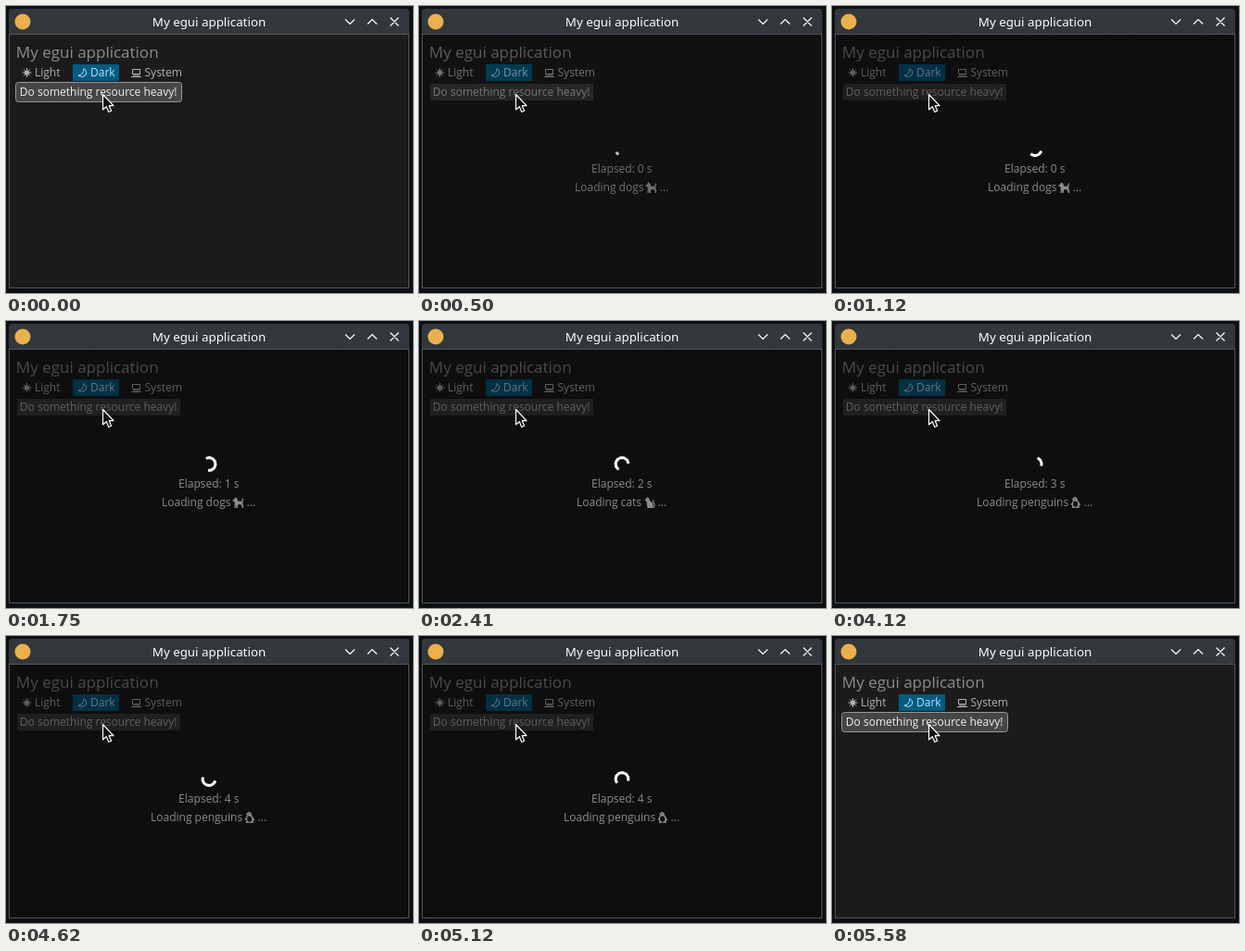
An HTML page for the animation above (6290 ms loop, 439 by 310 pixels).

```html
<!DOCTYPE html>
<html lang="en">
<head>
<meta charset="utf-8">
<title>My egui application</title>
<style>
  html, body { margin: 0; width: 100%; height: 100%; overflow: hidden; background: #0d1013; }
  svg { display: block; width: 439px; height: 310px; }
  text { font: 12px "Open Sans", "Noto Sans", sans-serif; white-space: pre; }
  .bar { font: 13.33px "Noto Sans", "Open Sans", sans-serif; fill: #fcfcfc; text-anchor: middle; }
  .heading { font-size: 17px; fill: #8c8c8c; }
  .line { fill: none; stroke: currentColor; stroke-width: 1; }
  .controls { fill: none; stroke: #fcfcfc; stroke-width: 1.2; }
  .light { fill: #b4b4b4; color: #b4b4b4; }
  .chosen { fill: #c0deff; color: #c0deff; }
  #modal { fill: #8c8c8c; }
  #spinner { fill: none; stroke: #fff; stroke-width: 3; stroke-linejoin: round; }

  #button rect { fill: #3c3c3c; }
  #button text { fill: #b4b4b4; }
  #button.hover rect, #button.press rect { x: 10.5px; y: 82.5px; width: 179px; height: 21px; rx: 3px; }
  #button.hover rect { fill: #464646; stroke: #969696; }
  #button.hover text { fill: #f0f0f0; }
  #button.press rect { fill: #373737; stroke: #fff; }
  #button.press text { fill: #fff; }
</style>
</head>
<body>
<svg viewBox="0 0 439 310">
  <defs>
    <linearGradient id="barFill" x2="0" y2="1">
      <stop stop-color="#33383d"/>
      <stop offset="1" stop-color="#2b3035"/>
    </linearGradient>
    <path id="dog" d="M.3 3.6 2 2.9 2.6 1.3 3.4.3 4.3 1.3 5.6 2 5.9 4.5 9.6 4.7 10.6 3.7 10.8 1.8 11.9 1.2 12 3.5 11.3 5.4 11.4 8 12.2 9.4 11.9 12H10.6L10.5 10 9.2 8.3 6.2 8.2 5.8 12H4.5L4.2 8.8 3.6 12H2.4L2.7 7.4 2.6 5.2.7 4.9Z"/>
    <path id="cat" d="M1 2.8 2.3 1.5 2.6.1 3.7 1 5 1.1 5.7 2.9 6 4.6 8 5.7 9.3 7.6 9.2 10 10.4 10.2 10.2 8 9 5.5 9.2 3.2 10.3 2.6 10.2 5.2 11.4 7.8 11.4 10.6 10.4 11.6 8.8 12H3.2L3.4 10.8 2.6 7.4 2.7 5.2 1.3 4.5Z"/>
    <g id="penguin">
      <path d="M3.8.3C5.9-.5 7.6.8 7.8 2.8 8 4 9.4 5.2 10.3 7.2L11.4 9.2 10 8.9 9.4 10.8 10.4 11.8 6.6 12 5.6 11.2 4.6 12 1.4 11.8 2.4 10.6 1.7 8.6.4 9 1.5 6.7C2.5 5 3 4.2 2.9 3L1.6 2.4 3 1.5Z"/>
      <path fill="#0e0e0e" d="M4 4.2Q5.6 5.3 7 4.4 8.7 7 8.2 9.2 7.3 10.7 5.6 10.7 3.6 10.6 3 8.6 2.9 6.1 4 4.2ZM4.4 1.5h1v1h-1z"/>
    </g>
  </defs>

  <rect width="439" height="310" fill="#0d1013"/>
  <path d="M3 305V7Q3 3 7 3H431Q435 3 435 7V305Z" fill="url(#barFill)"/>
  <rect x="3.5" y="30.5" width="431" height="274" fill="#1b1b1b" stroke="#50565b"/>
  <circle cx="18" cy="17" r="8.5" fill="#e9b04d"/>
  <text class="bar" x="219" y="22">My egui application</text>
  <path class="controls" d="M366 14.5 371 19.5 376 14.5M390 19.5 395 14.5 400 19.5M414.500 12.500 423.500 21.500M423.500 12.500 414.500 21.500"/>

  <text class="heading" x="10.800" y="56">My egui application</text>
  <g class="light">
    <circle cx="22.500" cy="72" r="2.600"/>
    <path class="line" d="M22.500 67V77M17.500 72H27.500M19 68.500 26 75.500M26 68.500 19 75.500"/>
    <text x="31" y="76">Light</text>
  </g>
  <g class="chosen">
    <rect x="72" y="63" width="50" height="18" fill="#005c80"/>
    <path class="line" d="M84 67.500Q88.500 71 85.500 75 82 78 78 75 83.500 74.500 84 67.500Z"/>
    <text x="91" y="76">Dark</text>
  </g>
  <g class="light">
    <path class="line" d="M136.500 68.500H144.500V73.500H136.500ZM135 76.500H146M137 75H144.500"/>
    <text x="149.500" y="76">System</text>
  </g>
  <g id="button">
    <rect x="12" y="84" width="176" height="18"/>
    <text x="14.800" y="97">Do something resource heavy!</text>
  </g>

  <g id="modal">
    <rect x="4" y="31" width="430" height="273" fill="#000" fill-opacity=".48"/>
    <polyline id="spinner"/>
    <text id="elapsed" x="186" y="180"></text>
    <text id="label" y="200"></text>
    <use id="animal" y="190"/>
    <text id="dots" y="200">...</text>
  </g>

  <path d="M104.500 95.500V112L108.300 108.700 110.800 114.500 113.600 113.300 111.200 107.700H116Z" fill="#111" stroke="#fff" stroke-width="1.200" stroke-linejoin="round"/>
</svg>
<script>
const LOOP = 6290, FPS = 24;
const PRESS = 7, OPEN = 10, CLOSE = 130, DONE = 134;
const FADE = 4;

// animal, label x, icon x, dots x
const DOGS = ["dog", 168, 244, 259.5];
const CATS = ["cat", 170, 243, 257.5];
const PENGUINS = ["penguin", 156, 257, 271.5];
const STAGES = [DOGS, DOGS, CATS, PENGUINS, PENGUINS];

const $ = id => document.getElementById(id);
const clamp = (v, lo, hi) => Math.min(hi, Math.max(lo, v));

// The arc turns once a second while its signed length follows a sine.
function spinnerPoints(time) {
  const start = (time - 1.12) * 2 * Math.PI + 0.26;
  const sweep = Math.sin(time - 0.62) * Math.PI * 4 / 3;
  return Array.from({ length: 8 }, (_, i) => {
    const a = start + sweep * i / 7;
    return `${(219 + 7 * Math.cos(a)).toFixed(2)},${(154.5 + 7 * Math.sin(a)).toFixed(2)}`;
  }).join(" ");
}

function drawModal(step) {
  const fadeIn = (step - OPEN + 1) / FADE;
  const fadeOut = (DONE - step) / FADE;
  const opacity = clamp(Math.min(fadeIn, fadeOut), 0, 1);
  $("modal").setAttribute("opacity", opacity);
  if (!opacity) return;

  const seconds = clamp(Math.floor((step - OPEN) / FPS), 0, 4);
  const [animal, x, iconX, dotsX] = STAGES[seconds];
  $("spinner").setAttribute("points", spinnerPoints(step / FPS));
  $("elapsed").textContent = `Elapsed: ${seconds} s`;
  $("label").textContent = `Loading ${animal}s`;
  $("label").setAttribute("x", x);
  $("animal").setAttribute("href", "#" + animal);
  $("animal").setAttribute("x", iconX);
  $("dots").setAttribute("x", dotsX);
}

function buttonState(step) {
  if (step < PRESS || step >= DONE) return "hover";
  return step < OPEN ? "press" : "";
}

const begin = performance.now();
let last = -1;

function tick() {
  const ms = (performance.now() - begin) % LOOP;
  // 24 steps a second, each starting on a 10 ms mark
  const step = Math.ceil((Math.floor(ms / 10) + 1) * FPS / 100) - 1;
  if (step !== last) {
    last = step;
    $("button").setAttribute("class", buttonState(step));
    drawModal(step);
  }
  requestAnimationFrame(tick);
}
tick();
</script>
</body>
</html>
```
